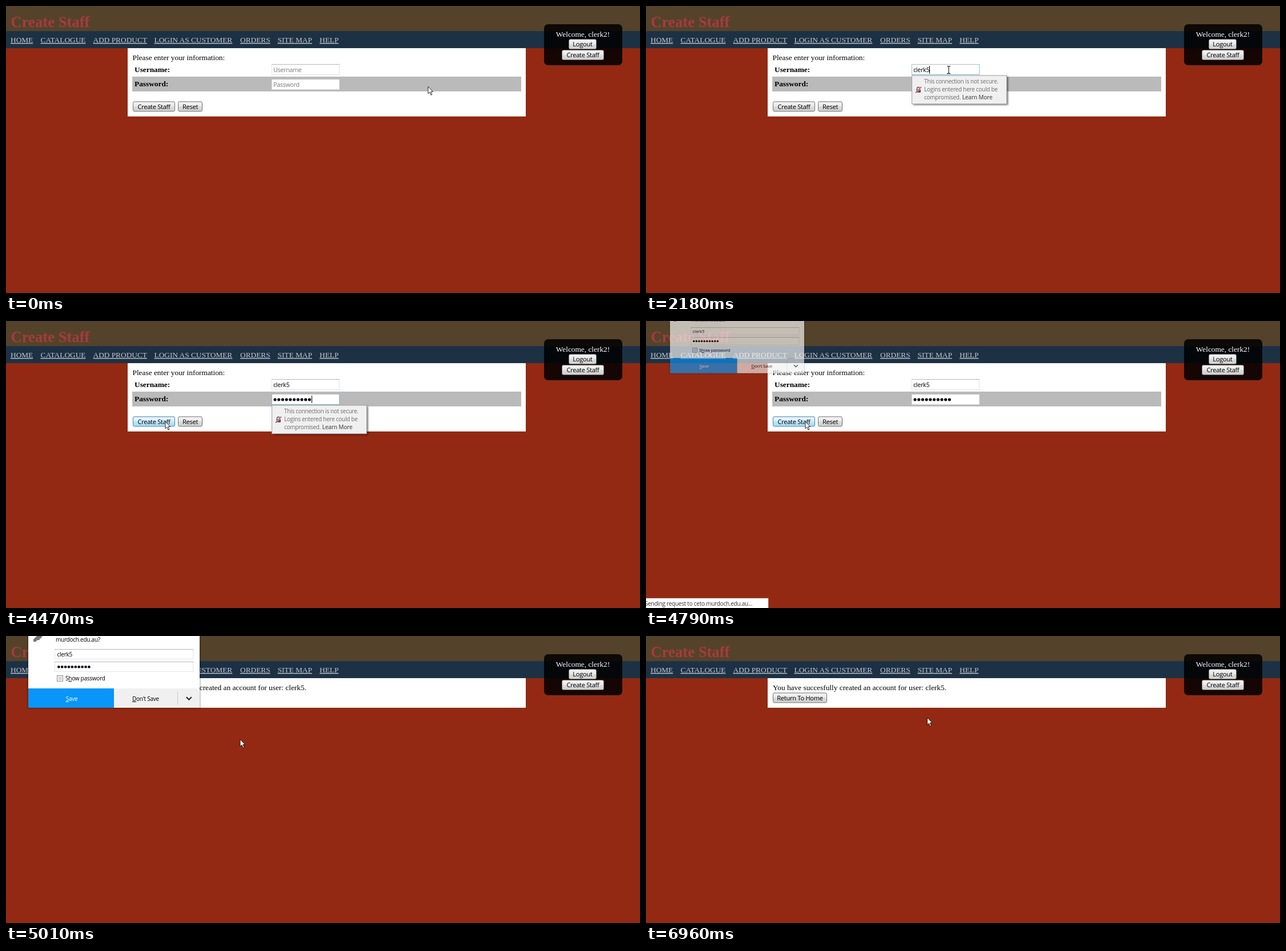
These frames come from a looping animation (1110x504 px, 8050 ms). An HTML page:

```html
<!DOCTYPE html>
<html lang="en">
<head>
<meta charset="utf-8">
<title>Create Staff</title>
<style>
html, body { margin: 0; width: 100%; height: 100%; overflow: hidden; background: #932912; }
svg { display: block; }
text { white-space: pre; }
.serif { font: 13.33px "Liberation Serif", serif; }
.bold { font-weight: 700; }
.nav { fill: #c3c8cb; text-decoration: underline; }
.ui { font: 10px "Open Sans", "Noto Sans", sans-serif; letter-spacing: -.025em; }
.btn { font-size: 11.1px; }
.field { font-size: 10.7px; }
.mid { text-anchor: middle; }
.hint { fill: #777; }
.u { text-decoration: underline; }
</style>
</head>
<body>
<svg id="stage" width="1110" height="504" viewBox="0 0 1110 504">
  <defs>
    <linearGradient id="plain" x2="0" y2="1">
      <stop offset="0" stop-color="#f4f4f4"/><stop offset=".5" stop-color="#e9e9e9"/>
      <stop offset=".5" stop-color="#dcdcdc"/><stop offset="1" stop-color="#cfcfcf"/>
    </linearGradient>
    <linearGradient id="lit" x2="0" y2="1">
      <stop offset="0" stop-color="#eaf6fd"/><stop offset=".5" stop-color="#d9f0fc"/>
      <stop offset=".5" stop-color="#bee6fd"/><stop offset="1" stop-color="#a7d9f5"/>
    </linearGradient>
    <filter id="soft" x="-10%" y="-10%" width="120%" height="120%"><feGaussianBlur stdDeviation="1.4"/></filter>
  </defs>
</svg>
<script>
const LOOP = 8050;
const GUEST = 'clerk2', USER = 'clerk5';
const stage = document.getElementById('stage');

const rect = (x, y, w, h, fill, more = '') =>
  `<rect x="${x}" y="${y}" width="${w}" height="${h}" fill="${fill}" ${more}/>`;
const text = (x, y, cls, str, more = '') => `<text x="${x}" y="${y}" class="${cls}" ${more}>${str}</text>`;
const group = (id, body) => `<g id="${id}">${body}</g>`;
const line = (d, color, w = 1) => `<path d="${d}" fill="none" stroke="${color}" stroke-width="${w}"/>`;

const button = (x, y, w, label, id = '') =>
  rect(x + .5, y + .5, w - 1, 17, 'url(#plain)', `rx="2.5" stroke="#707070" id="${id}"`) +
  text(x + w / 2, y + 13, 'ui btn mid', label);

const field = (x, y, w, h, id) =>
  rect(x + .5, y + .5, w - 1, h - 1, '#fff', `stroke="#e1e3e8" id="${id}"`) +
  line(`M${x} ${y + .5}h${w}`, '#b4b6bb');

const dots = (x, y, pitch, r, cls) => Array.from({ length: 10 }, (_, i) =>
  `<circle class="${cls}" cx="${x + pitch * i}" cy="${y}" r="${r}"/>`).join('');

const links = [[8, 'HOME'], [60.5, 'CATALOGUE'], [152.5, 'ADD PRODUCT'], [259.5, 'LOGIN AS CUSTOMER'],
  [410, 'ORDERS'], [475.5, 'SITE MAP'], [549, 'HELP']];

const header =
  rect(0, 0, 1110, 504, '#932912') + rect(0, 0, 1110, 44, '#54432a') + rect(0, 44, 1110, 30, '#1d3145') +
  text(8.5, 37, 'serif bold', 'Create Staff', 'style="font-size:26.67px" fill="#a83a3e"') +
  links.map(([x, s]) => text(x, 64, 'serif nav', s)).join('');

const account =
  rect(942, 32, 137, 72, '#000', 'rx="7" opacity=".86"') +
  text(1010, 54, 'serif mid', `Welcome, ${GUEST}!`, 'fill="#fff"') +
  button(985, 58, 49, 'Logout') + button(973, 77, 74, 'Create Staff');

const form =
  rect(213, 74, 697, 120, '#fff') + rect(221, 124, 681, 26, '#bababa') +
  text(221.5, 95, 'serif', 'Please enter your information:') +
  text(225, 115.5, 'serif bold', 'Username:') + text(225, 141, 'serif bold', 'Password:') +
  field(465, 102, 119, 19, 'nameBox') + field(465, 128, 119, 19, 'passBox') +
  text(468, 116, 'ui field hint', 'Username', 'id="nameHint"') +
  text(468, 142, 'ui field hint', 'Password', 'id="passHint"') +
  text(468, 116, 'ui field', '', 'id="name"') + dots(471, 138, 6.7, 2.6, 'dot') +
  rect(468, 105, 1, 14, '#000', 'id="nameCaret"') + rect(468, 131, 1, 13, '#000', 'id="passCaret"') +
  button(222, 167.5, 74, 'Create Staff', 'create') + button(301, 167.5, 43, 'Reset');

const tip =
  rect(468, 124, 166, 50, '#000', 'opacity=".5" filter="url(#soft)"') +
  rect(465.5, 122, 166, 50, '#f0f0f0', 'stroke="#9c9c9c"') +
  line('M474.5 147v-2a2.5 2.5 0 0 1 5 0v2', '#555', 1.4) + rect(473, 146.5, 8, 5.5, '#555', 'rx="1"') +
  line('M472 152L482 142.5', '#f0f0f0', 2.6) + line('M472 152.5L482 142', '#d03030', 1.3) +
  ['This connection is not secure.', 'Logins entered here could be',
    'compromised. <tspan font-weight="600" fill="#606060">Learn More</tspan>']
    .map((s, i) => text(487, 136.2 + 14.1 * i, 'ui', s, 'fill="#6c6c6c"')).join('');

const done =
  rect(213, 74, 697, 52, '#fff') +
  text(222, 95, 'serif', `You have succesfully created an account for user: ${USER}.`) +
  button(222, 99.5, 95, 'Return To Home');

const popup =
  rect(38, -60, 302, 187, '#000', 'opacity=".35" filter="url(#soft)"') +
  rect(39, -60, 300, 152, '#fff') +
  '<path d="M48 10V6L57-3H67L62 2V4H59V7H55L52 10Z" fill="#757575"/>' +
  text(87, 10, 'ui', 'murdoch.edu.au?') +
  field(85, 23, 243, 18, '') + field(85, 45, 243, 18, '') +
  text(89.5, 36, 'ui', USER) + dots(92.3, 54.3, 5.9, 2.3, '') +
  rect(89.5, 69.5, 10, 10, '#f4f4f4', 'stroke="#8e8f8f"') + rect(91.5, 71.5, 6, 6, '#d6d8db') +
  text(104, 78, 'ui', 'S<tspan class="u">h</tspan>ow password') +
  rect(39, 92, 150, 34, '#0996f8') + rect(189, 92, 150, 34, '#f0f0f0') +
  rect(189, 92, 112, 34, '#e3e3e3', 'id="dontSave"') + line('M300.5 98V120', '#c8c8c8') +
  text(115, 114, 'ui mid', '<tspan class="u">S</tspan>ave', 'fill="#fff"') +
  text(221, 114, 'ui', '<tspan class="u">D</tspan>on\'t Save') +
  line('M315.8 107.3L320.3 111.8L324.8 107.3', '#222', 2);

const status = rect(-2, 487, 216, 18, '#fff', 'stroke="#ddd" stroke-width=".5"') +
  text(-2, 500, 'ui', 'Sending request to ceto.murdoch.edu.au...', 'fill="#333"');

const arrow = '<path d="M.5.5V13L3.3 10.3L5.5 15.4L7.4 14.5L5.3 9.6H9Z" fill="#fff" stroke="#111" stroke-width=".9"/>';
const beam = line('M-3-6.2h2l1 1l1-1h2M0-5.2V5.6M-3 6.6h2l1-1l1 1h2', '#111', 1.1);

stage.insertAdjacentHTML('beforeend', header + group('form', form) + group('done', done) + account +
  group('tip', tip) + group('popup', popup) + group('status', status) +
  group('cursor', group('arrow', arrow) + group('beam', beam)));

const el = {};
stage.querySelectorAll('[id]').forEach(n => el[n.id] = n);
const passDots = stage.querySelectorAll('.dot');

// Each row holds from its time until the next one.
const mouse = [[0, 738.5, 141], [70, 726, 137], [150, 684, 128], [230, 618, 118], [310, 562, 113], [390, 536, 112],
  [470, 530, 112], [4070, 508, 117], [4150, 442, 141], [4230, 362, 168], [4310, 308, 181], [4390, 285, 180],
  [4470, 278.5, 176], [4940, 345, 179], [5010, 409.5, 181], [5100, 421, 181], [5470, 402, 170],
  [5550, 352, 139], [5630, 304, 111], [5720, 281, 101], [5800, 270, 98], [5890, 266, 98], [6200, 262, 98],
  [6270, 258, 98], [6520, 257, 98], [6800, 330, 112], [6880, 438, 134], [6960, 492, 143]];
const typed = [[0, 0], [1400, 1], [1470, 2], [1640, 3], [1710, 4], [1880, 5], [2180, 6]];
const secret = [[0, 0], [3280, 1], [3360, 3], [3440, 5], [3520, 7], [3600, 8], [3680, 10]];
const tipFade = [[0, 0], [550, .4], [630, .8], [710, 1], [2580, .5], [2650, 1], [4630, 0]];
const popFade = [[0, 0, 1], [4710, .25, .55], [4790, .65, .783], [4870, 1, 1], [6730, .4, 1], [6800, 0, 1]];

const at = (rows, t) => rows.findLast(r => r[0] <= t);
const within = (t, a, b) => t >= a && t < b;
const show = (node, on) => node.style.display = on ? '' : 'none';
const inside = (x, y, l, t, r, b) => x >= l && x <= r && y >= t && y <= b;

function draw(t) {
  const [, x, y] = at(mouse, t);
  const sent = t >= 4870;
  show(el.form, !sent);
  show(el.done, sent);

  const count = at(typed, t)[1];
  const str = USER.slice(0, count);
  if (el.name.textContent !== str) el.name.textContent = str;
  show(el.nameHint, !count);
  show(el.nameCaret, within(t, 550, 1070) || within(t, 1400, 2580));
  el.nameCaret.setAttribute('x', Math.round(468 + (count ? el.name.getComputedTextLength() : 0)));

  const hidden = at(secret, t)[1];
  passDots.forEach((d, i) => show(d, i < hidden));
  show(el.passHint, !hidden);
  show(el.passCaret, within(t, 2580, 3120) || within(t, 3280, 4630));
  el.passCaret.setAttribute('x', Math.round(468 + 6.65 * hidden));

  const overName = inside(x, y, 465, 102, 584, 121);
  const border = on => on ? '#8dbfdd' : '#e1e3e8';
  el.nameBox.setAttribute('stroke', border(within(t, 550, 2580) || overName));
  el.passBox.setAttribute('stroke', border(within(t, 2580, 4630)));

  const overCreate = inside(x, y, 222, 168, 296, 186);
  el.create.setAttribute('fill', overCreate ? 'url(#lit)' : 'url(#plain)');
  el.create.setAttribute('stroke', overCreate ? '#3c7fb1' : '#707070');

  const tipAlpha = at(tipFade, t)[1];
  show(el.tip, tipAlpha);
  el.tip.setAttribute('opacity', tipAlpha);
  el.tip.setAttribute('transform', `translate(0 ${t < 2580 ? 0 : 26})`);

  const [, alpha, scale] = at(popFade, t);
  show(el.popup, alpha);
  el.popup.setAttribute('opacity', alpha);
  el.popup.setAttribute('transform', `translate(53 -32) scale(${scale}) translate(-53 32)`);
  show(el.dontSave, inside(x, y, 189, 92, 300, 126));
  show(el.status, within(t, 4710, 4870));

  show(el.beam, overName && !sent);
  show(el.arrow, !overName || sent);
  el.cursor.setAttribute('transform', `translate(${x} ${y})`);
}

const start = performance.now();
function tick() {
  draw((performance.now() - start) % LOOP);
  requestAnimationFrame(tick);
}
tick();
</script>
</body>
</html>
```
